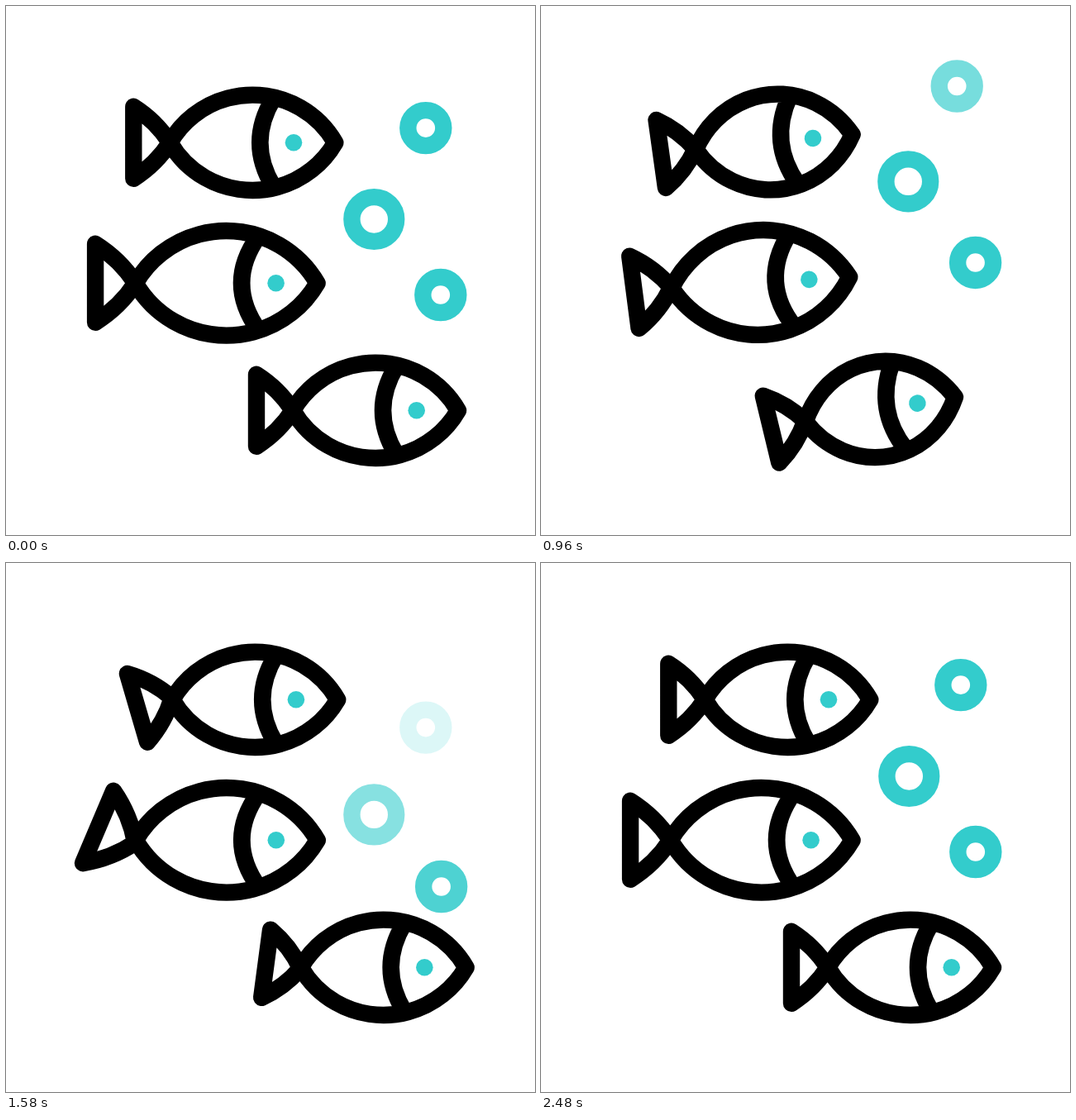
Recreate the animation shown at these times as an HTML page with a canvas. Size 640 by 640 pixels, loop 2600 ms.

```html
<!DOCTYPE html>
<html lang="en">
<head>
<meta charset="utf-8">
<title>Swimming fish</title>
<style>
  html, body { margin: 0; width: 100%; height: 100%; overflow: hidden; background: #fff; }
  canvas { display: block; }
</style>
</head>
<body>
<canvas id="stage" width="640" height="640"></canvas>
<script>
const ctx = document.getElementById('stage').getContext('2d');
const TEAL = '#33cccc', LOOP = 2600, TICK = 20, HOLD = 100, LAST = 119;
const RAD = Math.PI / 180;

const clamp = v => Math.min(1, Math.max(0, v));
const ramp = (n, from, to) => clamp((n - from) / (to - from));
const smooth = u => u * u * (3 - 2 * u);

// Eased value of a list of [tick, value] keys.
function track(keys, n) {
  let value = keys[0][1];
  for (let i = 1; i < keys.length; i++) {
    const [from, a] = keys[i - 1], [to, b] = keys[i];
    if (n >= from) value = a + (b - a) * smooth(ramp(n, from, to));
  }
  return value;
}

// Body size: half length and half height. Times: turn away, hold, dash forward, settle.
const small = { length: 100, height: 57.7, gill: [25, 53, -7], eye: 49.7, fin: [44, 43.5],
                shift: [-38, -1.4], tilt: 9.5, squeeze: 0.085 };
const large = { length: 110, height: 63.3, gill: [39, 57, -2], eye: 60, fin: [48.5, 47.5],
                shift: [-42, -3.5], tilt: 14.5, squeeze: 0.085 };
const PIVOT = 8; // the fin turns about a point behind the body's end
const fishes = [
  { ...small, x: 298.3, y: 165.3, times: [2, 20, 33, 55, 83], dash: 12,
    tail: [[0, 0], [24, -17], [33, -18], [55, 18], [77, -18], [99, 18], [115, 0]] },
  { ...large, x: 266.6, y: 335.3, times: [0, 16, 28, 50, 76], dash: 12,
    tail: [[0, 0], [17, 21], [34, 23], [50, -22], [68, 23], [88, 23], [108, 0]] },
  { ...small, x: 447, y: 489.3, times: [10, 27, 41, 62, 88], dash: 17.3,
    tail: [[9, 0], [29, -16], [37, -18], [51, 17], [62, -19], [81, 19], [100, -19], [116, 0]] }
];

function drawFish(f, n) {
  const [start, away, leave, ahead, end] = f.times;
  const turn = track([[start, 0], [away, 1], [leave, 1], [ahead, 0]], n);
  const dash = track([[leave, 0], [ahead, f.dash], [end, 0]], n);
  const stretch = 1 - f.squeeze * turn;
  const { length, height } = f;
  const radius = (length ** 2 + height ** 2) / (2 * height);
  const half = Math.asin(length / radius), up = -Math.PI / 2;

  ctx.save();
  ctx.translate(f.x + f.shift[0] * turn + dash, f.y + f.shift[1] * turn);
  ctx.rotate(-f.tilt * turn * RAD);

  ctx.beginPath();
  ctx.save();
  ctx.scale(stretch, 1);
  ctx.arc(0, radius - height, radius, up - half, up + half);
  ctx.arc(0, height - radius, radius, -up - half, -up + half);
  ctx.closePath();
  const [gx, gy, bend] = f.gill;
  ctx.moveTo(gx, -gy);
  ctx.quadraticCurveTo(bend, 0, gx, gy);
  ctx.restore();

  // The fin's corners travel in straight lines, so sine and cosine are eased separately.
  const swing = fn => track(f.tail.map(([at, deg]) => [at, fn(deg * RAD)]), n);
  const c = swing(Math.cos), s = swing(Math.sin), [fx, fy] = f.fin;
  ctx.save();
  ctx.transform(c, s, -s, c, -length * stretch - PIVOT, 0);
  ctx.translate(PIVOT, 0);
  ctx.moveTo(0, 0);
  ctx.quadraticCurveTo(-fx * 0.38, -fy * 0.6, -fx, -fy);
  ctx.lineTo(-fx, fy);
  ctx.quadraticCurveTo(-fx * 0.38, fy * 0.6, 0, 0);
  ctx.closePath();
  ctx.restore();
  ctx.strokeStyle = '#000';
  ctx.stroke();

  ctx.beginPath();
  ctx.arc(f.eye * stretch, 0, 10.3, 0, 7);
  ctx.fillStyle = TEAL;
  ctx.fill();
  ctx.restore();
}

const bubbles = [
  { x: 507.8, y: 147.6, r: 21.5, leave: 0, enter: 66 },
  { x: 445.3, y: 258, r: 26.9, leave: 4.6, enter: 61 },
  { x: 525.8, y: 349.5, r: 21.5, leave: 9.5, enter: 57.6 }
];
const RISE = 55, TRAVEL = 52;

function drawBubble(b, n) {
  const leaving = n < 61;
  const age = Math.max(0, n - (leaving ? b.leave : b.enter));
  const climb = RISE * smooth(clamp(age / TRAVEL));
  const sway = leaving
    ? track([[0, 0], [17, -11], [35, 0], [53, -11]], age)
    : track([[14, 0], [27, 9.3], [46, 0]], age);
  ctx.globalAlpha = leaving ? 1 - ramp(age, 39, 51) : ramp(age, 6, 18);
  ctx.beginPath();
  ctx.arc(b.x + sway, b.y - climb + (leaving ? 0 : RISE), b.r, 0, 7);
  ctx.strokeStyle = TEAL;
  ctx.stroke();
  ctx.globalAlpha = 1;
}

ctx.lineWidth = 20.4;
ctx.lineJoin = 'round';
const began = performance.now();

function draw() {
  const time = (performance.now() - began) % LOOP;
  const n = Math.min(LAST, Math.max(0, Math.floor((time - HOLD) / TICK)));
  ctx.fillStyle = '#fff';
  ctx.fillRect(0, 0, 640, 640);
  fishes.forEach(f => drawFish(f, n));
  bubbles.forEach(b => drawBubble(b, n));
  requestAnimationFrame(draw);
}
draw();
</script>
</body>
</html>
```
